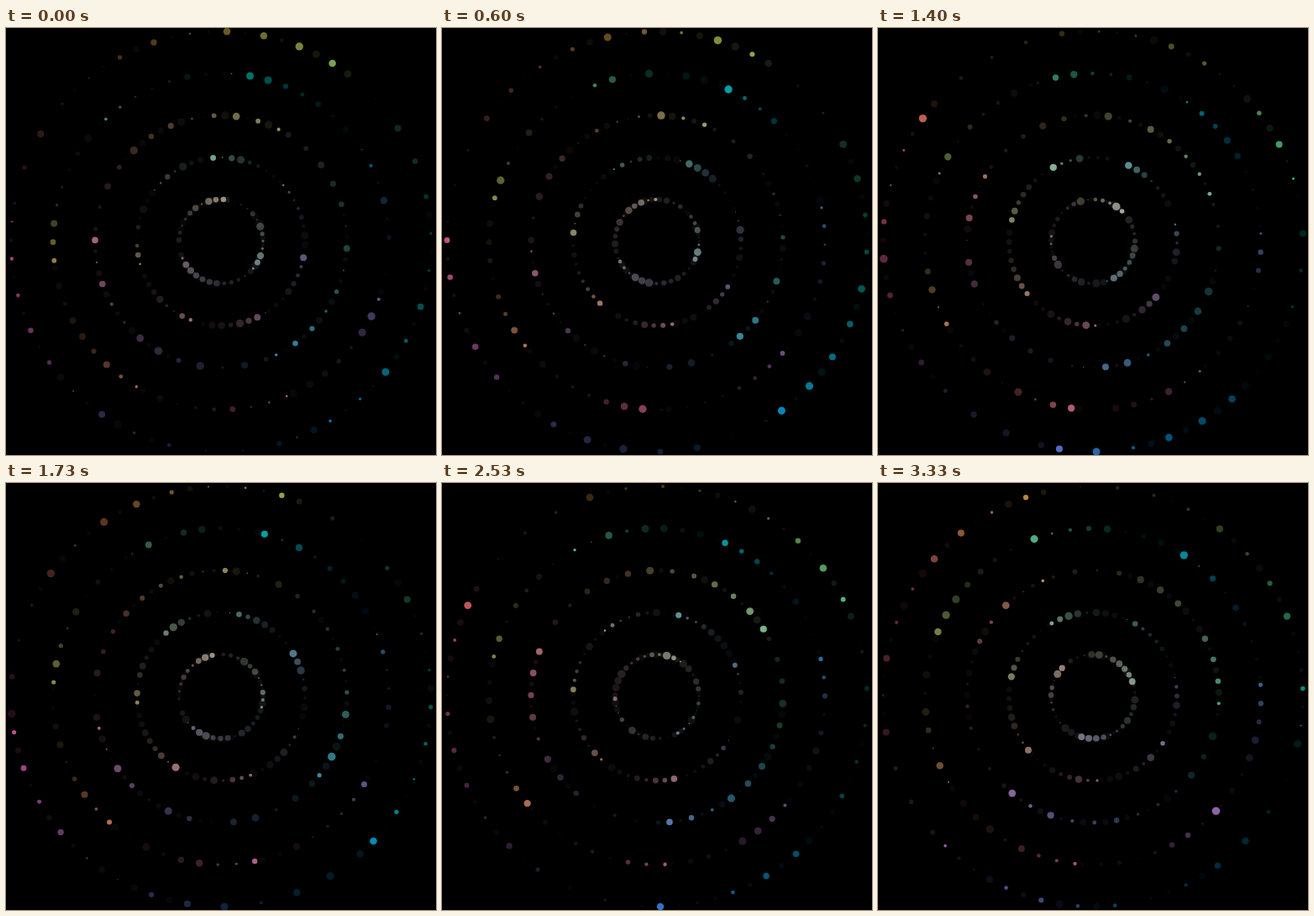
Animation of 512x508 px, one loop 3.39 s. Source, as an HTML page with a canvas:

```html
<!DOCTYPE html>
<html lang="en">
<head>
<meta charset="utf-8">
<title>Dotted rings</title>
<style>
  html, body { margin: 0; width: 100%; height: 100%; overflow: hidden; background: #000; }
  canvas { display: block; }
</style>
</head>
<body>
<canvas id="stage" width="512" height="508"></canvas>
<script>
const ctx = document.getElementById('stage').getContext('2d');
const LOOP = 3390, FRAMES = 51, TRAIL = 60, FADE = 0.95;
const CX = 256, CY = 254, SPACING = 50;
const UNIT = 360 / 284;
const toRadians = degrees => degrees * Math.PI / 180;

const random = (step, ring) => {
  const v = Math.sin(step * 12.9898 + ring * 78.233) * 43758.5453;
  return v - Math.floor(v);
};

// Greens and yellows are a little lighter than blues and pinks; outer rings are more vivid.
function dotColor(hue, ring) {
  const light = 58 + 10 * Math.cos(toRadians(hue - 130));
  return `lch(${light.toFixed(1)}% ${10 * ring} ${hue.toFixed(1)})`;
}

// Each ring has a pen that jumps by a fixed angle and stamps one dot per step.
function drawDot(step, ring) {
  const odd = ring % 2;
  const angle = 166 - 36 / ring + step * UNIT * (odd ? 192 : 121);
  const hue = (((angle + (odd ? 90 : 180)) % 360) + 360) % 360;
  const rad = toRadians(angle);
  ctx.fillStyle = dotColor(hue, ring);
  ctx.beginPath();
  ctx.arc(CX + ring * SPACING * Math.sin(rad), CY - ring * SPACING * Math.cos(rad),
    0.5 + 4.3 * random(step, ring), 0, Math.PI * 2);
  ctx.fill();
}

function draw(now) {
  const frame = Math.floor((now % LOOP) / LOOP * FRAMES);
  const last = Math.max(0, frame * 4 - 3);
  ctx.globalAlpha = 1;
  ctx.fillStyle = '#000';
  ctx.fillRect(0, 0, 512, 508);
  for (let age = TRAIL; age >= 0; age--) {
    ctx.globalAlpha = FADE ** age;
    for (let ring = 1; ring <= 5; ring++) drawDot(last - age, ring);
  }
}

const start = performance.now();
function tick() {
  draw(performance.now() - start);
  requestAnimationFrame(tick);
}
tick();
</script>
</body>
</html>
```
